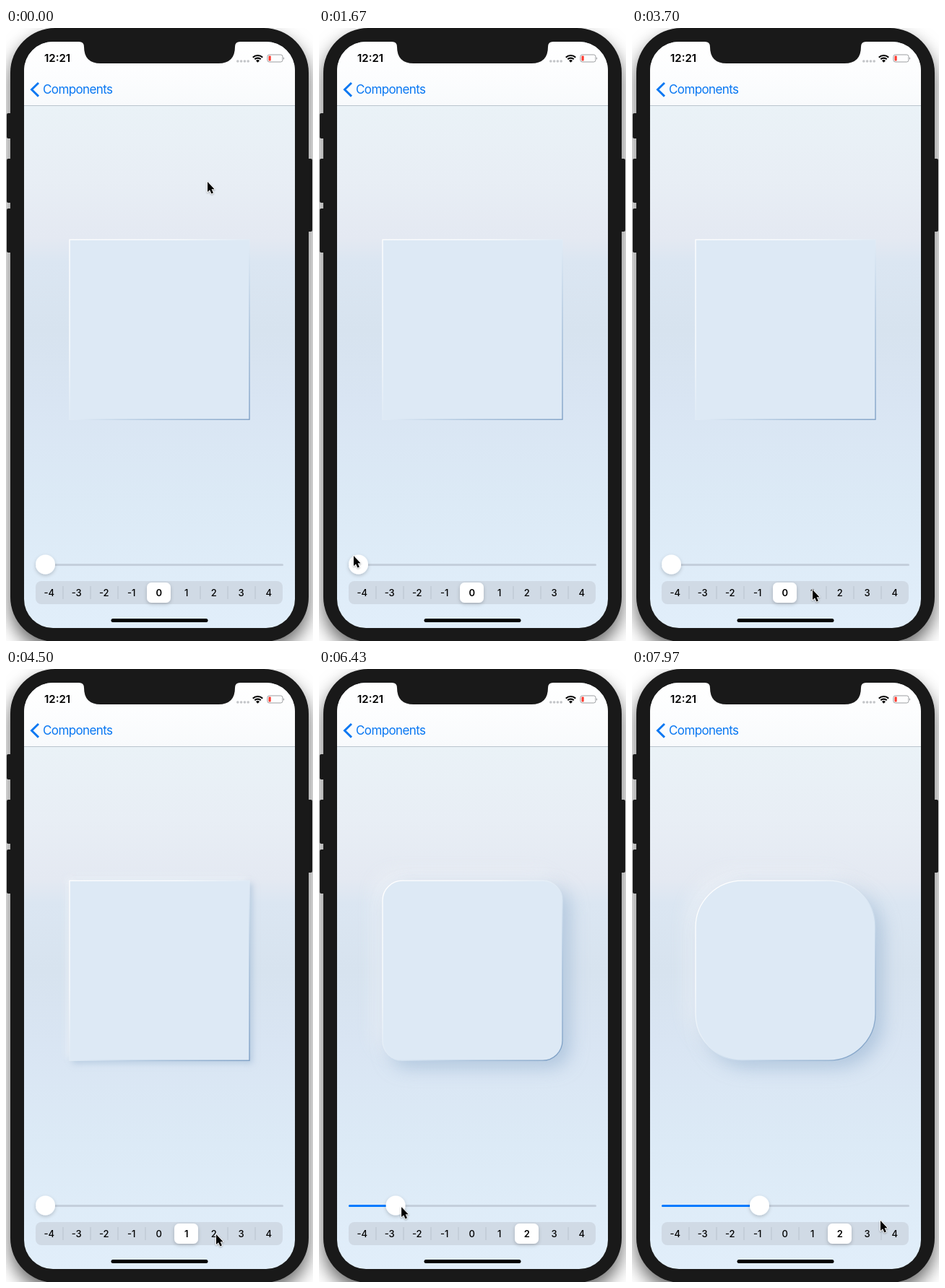
Write an HTML page that moves like this. It is 425x849 px and loops after 8 s.

```html
<!DOCTYPE html>
<html lang="en">
<head>
<meta charset="utf-8">
<title>Soft card</title>
<style>
@property --x { syntax: "<length>"; inherits: true; initial-value: 0px; }

html, body { margin: 0; width: 100%; height: 100%; overflow: hidden; background: #fff; }
.stage {
  position: absolute; inset: 0 auto auto 0; width: 425px; height: 849px; overflow: hidden;
  --r: calc(var(--x) * .53);
  font-family: Inter, "Liberation Sans", sans-serif;
}
.stage > * { position: absolute; }
.bezel {
  left: 6px; top: 0; width: 413px; height: 850px; border-radius: 62px;
  background: #191919; box-shadow: 0 12px 24px rgba(0, 0, 0, .6);
}
.screen {
  left: 25px; top: 19px; width: 375px; height: 812px; border-radius: 40px; overflow: hidden;
  background: linear-gradient(#eaf2f7 88px, #e8eef5 190px, #e4e9f2 272px, #dbe6f2 305px,
    #d7e3ef 400px, #d9e5f3 500px, #dceaf6 640px, #e1eefa);
}
.nav { height: 88px; background: linear-gradient(#fff, #fcfdfe 55%, #f8fafc); border-bottom: 1px solid #bac5ce; }
.shadow { left: 88px; top: 293px; width: 249px; height: 249px; border-radius: var(--r); }
.card { rx: var(--r); }
.fill { width: calc(var(--x) + 10px); }
.knob { transform: translateX(var(--x)); }
.seg text { font-size: 13px; font-weight: 500; text-anchor: middle; }

.stage, .shadow, .pick, .cursor, .seg * { animation: 8s linear infinite; }
.stage { animation-name: drag; }
.shadow { animation-name: lift; animation-timing-function: step-end; }
.pick { animation-name: pick; }
.cursor { animation-name: roam; }
.seg * { animation-timing-function: step-end; }
.n0 { animation-name: n0 !important; }
.n1 { animation-name: n1 !important; }
.n2 { animation-name: n2 !important; }
.d4 { animation-name: d4 !important; }
.d5 { animation-name: d5 !important; }
.d6 { animation-name: d6 !important; }
.d7 { animation-name: d7 !important; }

@keyframes drag {
  0%, 74.375% { --x: 0px; }
  80.375% { --x: 51.5px; }
  91.25%, 100% { --x: 122px; }
}
@keyframes lift {
  0% { box-shadow: none; }
  47.5% { box-shadow: 4px 4px 8px rgba(150, 178, 208, .5), -4px -4px 8px rgba(236, 241, 247, .85); }
  60%, 100% { box-shadow: 10px 10px 24px rgba(150, 178, 208, .6), -10px -10px 24px rgba(236, 241, 247, .85); }
}
@keyframes pick {
  0%, 47.5% { transform: translateX(0); animation-timing-function: ease-out; }
  50.9%, 60% { transform: translateX(38px); animation-timing-function: ease-out; }
  63.4%, 100% { transform: translateX(76px); }
}
@keyframes n0 { 0% { font-weight: 600; } 47.5%, 100% { font-weight: 500; } }
@keyframes n1 { 0% { font-weight: 500; } 47.5% { font-weight: 600; } 60%, 100% { font-weight: 500; } }
@keyframes n2 { 0% { font-weight: 500; } 60%, 100% { font-weight: 600; } }
@keyframes d4 { 0% { opacity: 0; } 47.5%, 100% { opacity: 1; } }
@keyframes d5 { 0% { opacity: 0; } 60%, 100% { opacity: 1; } }
@keyframes d6 { 0% { opacity: 1; } 47.5%, 100% { opacity: 0; } }
@keyframes d7 { 0% { opacity: 1; } 60%, 100% { opacity: 0; } }
@keyframes roam {
  0%, 1% { transform: translate(279px, 213px); animation-timing-function: ease-in-out; }
  17.5% { transform: translate(62px, 727px); }
  20.875% { transform: translate(48px, 731px); }
  25% { transform: translate(44px, 739px); }
  31.25% { transform: translate(58px, 742px); animation-timing-function: ease-in-out; }
  37.875% { transform: translate(208px, 768px); }
  45.625%, 50.6% { transform: translate(250px, 778px); }
  52.125% { transform: translate(261px, 778px); animation-timing-function: ease-out; }
  55.875%, 62.5% { transform: translate(291px, 783px); }
  69.125% { transform: translate(203px, 759px); animation-timing-function: ease-out; }
  72.25%, 74.375% { transform: translate(62px, 745px); }
  80.375% { transform: translate(114px, 745px); }
  91.25%, 92.5% { transform: translate(184px, 746px); animation-timing-function: ease-in-out; }
  99.4%, 100% { transform: translate(344px, 764px); }
}
</style>
</head>
<body>
<div class="stage">
  <svg width="425" height="849" fill="#222">
    <rect x="1" y="118" width="8" height="35" rx="2"/>
    <rect x="1" y="181" width="8" height="61" rx="2"/>
    <rect x="1" y="250" width="8" height="61" rx="2"/>
    <rect x="416" y="181" width="8" height="101" rx="2"/>
  </svg>
  <div class="bezel"></div>
  <div class="screen"><div class="nav"></div></div>
  <div class="shadow"></div>
  <svg width="425" height="849">
    <defs>
      <linearGradient id="edge" x1="0" y1="0" x2="1" y2="1">
        <stop stop-color="#fff"/>
        <stop offset=".3" stop-color="#fbfdfe"/>
        <stop offset=".53" stop-color="#dce8f4"/>
        <stop offset=".75" stop-color="#a3bdd8"/>
        <stop offset="1" stop-color="#789bc2"/>
      </linearGradient>
      <filter id="soft" x="-50%" y="-50%" width="200%" height="200%">
        <feDropShadow dx="0" dy="2" stdDeviation="2.5" flood-opacity=".2"/>
      </filter>
    </defs>

    <path fill="#191919" d="M101 18V19Q108 19 108 26Q108 49 131 49H294Q317 49 317 26Q317 19 324 19V18Z"/>
    <text x="53" y="47" font-size="15" font-weight="600">12:21</text>
    <g fill="#c3c5c8">
      <circle cx="320.8" cy="46" r="1.8"/><circle cx="325.6" cy="46" r="1.8"/>
      <circle cx="330.4" cy="46" r="1.8"/><circle cx="335.2" cy="46" r="1.8"/>
    </g>
    <g fill="none" stroke="#000" stroke-width="2.2">
      <path d="M341.8 40.7A9.6 9.6 0 0 1 355.2 40.7"/>
      <path d="M344.3 43.3A6 6 0 0 1 352.7 43.3"/>
    </g>
    <path d="M348.5 47.7L346 45.2A3.6 3.6 0 0 1 351 45.2Z"/>
    <rect x="361.9" y="37" width="21" height="10" rx="2.6" fill="none" stroke="#9c9ea1"/>
    <rect x="363.5" y="38.5" width="3.2" height="7" rx="1" fill="#ff3b30"/>
    <path d="M384 40.2Q386.4 42 384 43.8Z" fill="#9c9ea1"/>
    <path d="M45 76L35.5 85.3L45 94.6" fill="none" stroke="#0877f2" stroke-width="2.9"/>
    <text x="51" y="91" font-size="17" letter-spacing="-.6" fill="#0877f2">Components</text>

    <rect class="card" x="88" y="293.2" width="249" height="249" fill="#dde9f5" stroke="url(#edge)" stroke-width="1.3"/>

    <rect x="41" y="742" width="343" height="3" rx="1.5" fill="#c4cfdc"/>
    <rect class="fill" x="41" y="742" height="3" rx="1.5" fill="#007aff"/>
    <circle class="knob" cx="54.5" cy="743" r="13.5" fill="#fff" filter="url(#soft)"/>

    <rect x="41" y="766" width="342" height="32" rx="8" fill="#d0dae5"/>
    <g class="seg" id="dividers" fill="#b7c1cd"></g>
    <rect class="pick" x="195" y="768" width="33" height="28" rx="6.5" fill="#fff" filter="url(#soft)"/>
    <g class="seg" id="labels"></g>

    <rect x="145.5" y="818" width="134" height="5" rx="2.5"/>
    <g class="cursor">
      <path d="M0 0V14L3.1 11.2L5.5 16.4L7.9 15.3L5.6 10.2H9.6Z" stroke="#fff" stroke-width="1.8"
        stroke-linejoin="round" paint-order="stroke" style="filter:drop-shadow(0 1px 1px rgba(0,0,0,.3))"/>
    </g>
  </svg>
</div>
<script>
const values = [-4, -3, -2, -1, 0, 1, 2, 3, 4];
const step = 38;
document.getElementById("labels").innerHTML = values.map((v, i) =>
  `<text class="n${v}" x="${59.7 + i * step}" y="787">${v}</text>`).join("");
document.getElementById("dividers").innerHTML = values.slice(1).map((v, i) =>
  `<rect class="d${i + 1}" x="${78.5 + i * step}" y="773" width="1" height="18"/>`).join("");
</script>
</body>
</html>
```
